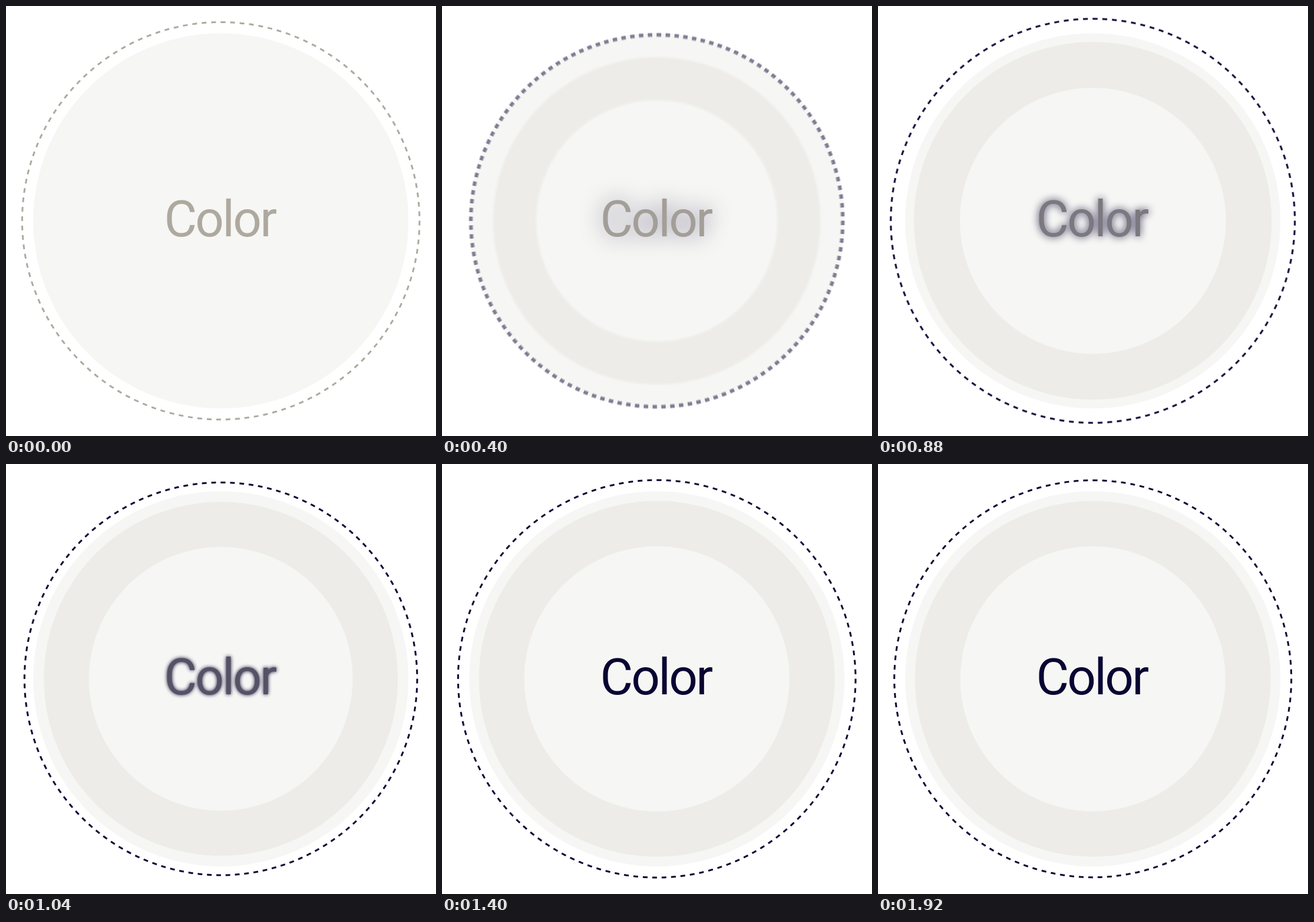
These frames come from a looping animation (730x730 px, 1960 ms). An HTML page with a canvas:

```html
<!DOCTYPE html>
<html lang="en">
<head>
<meta charset="utf-8">
<title>Color</title>
<style>
  html, body { margin: 0; width: 100%; height: 100%; overflow: hidden; background: #fff; }
  canvas { display: block; width: 730px; height: 730px; }
</style>
</head>
<body>
<canvas id="stage" width="730" height="730"></canvas>
<script>
const SIZE = 730, CENTER = 364.7, LOOP = 1960, STEP = 40, START = 240;
const SHUTTER = 20, SAMPLES = 10, DASH_COUNT = 132.08;
const INK = [8, 5, 51], MUTED = [174, 169, 159], DISC = '#f6f6f4', BAND = '#edece8';

const stage = document.getElementById('stage').getContext('2d');
const buffer = document.createElement('canvas');
buffer.width = buffer.height = SIZE;
const scene = buffer.getContext('2d');

const clamp = v => Math.max(0, Math.min(1, v));
const progress = (t, from, to) => clamp((t - from) / (to - from));
const mix = (a, b, k) => `rgb(${a.map((v, i) => Math.round(v + (b[i] - v) * k))})`;

// Decelerating growth that reaches 1 at time `hit`, then a damped swing around 1.
function bounce(t, { from, hit, power, half, amp, decay }) {
  if (t < hit) return 1 - (1 - from) * (1 - progress(t, START, hit)) ** power;
  const x = (t - hit) / half;
  return 1 + amp * Math.exp(-decay * x) * Math.sin(Math.PI * x);
}

const bandMove = { from: 0.648, hit: 480, power: 1.3, half: 440, amp: 0.1354, decay: 2.37 };
const dashMove = { from: 0.737, hit: 515, power: 1.62, half: 440, amp: 0.097, decay: 1.3 };

function disc(radius, color) {
  scene.fillStyle = color;
  scene.beginPath();
  scene.arc(CENTER, CENTER, radius, 0, 2 * Math.PI);
  scene.fill();
}

function dashes(radius, color, alpha) {
  if (alpha <= 0) return;
  const dash = Math.PI * radius / DASH_COUNT;
  scene.globalAlpha = alpha;
  scene.strokeStyle = mix(color, color, 0);
  scene.lineWidth = 3;
  scene.setLineDash([dash, dash]);
  scene.beginPath();
  scene.arc(CENTER, CENTER, radius, -Math.PI / 2, 1.5 * Math.PI);
  scene.stroke();
  scene.globalAlpha = 1;
}

function drawRings(t, shown) {
  scene.fillStyle = '#fff';
  scene.fillRect(0, 0, SIZE, SIZE);
  disc(318.5, DISC);
  if (shown > 0) {
    const scale = bounce(t, bandMove);
    scene.globalAlpha = shown;
    disc(302 * scale, BAND);
    scene.globalAlpha = 1;
    disc(225 * scale, DISC);
  }
  dashes(337.3, MUTED, 1 - shown);
  dashes(337.3 * bounce(t, dashMove), INK, shown);
}

function drawWord(color, alpha = 1, blur = 0) {
  stage.save();
  stage.font = '400 85.5px Roboto, "Liberation Sans", sans-serif';
  stage.letterSpacing = '-2.8px';
  stage.globalAlpha = alpha;
  stage.fillStyle = color;
  if (blur > 0) stage.filter = `blur(${blur}px)`;
  const x = 273.5 + stage.measureText('Color').actualBoundingBoxLeft;
  stage.fillText('Color', x, 391.3);
  stage.restore();
}

function draw(t) {
  const shown = progress(t, START - STEP, START + 2 * STEP) * (t >= START);
  // Running average of sub-steps gives the motion blur.
  for (let i = 0; i < SAMPLES; i++) {
    drawRings(t + SHUTTER * ((i + 0.5) / SAMPLES - 0.5), shown);
    stage.globalAlpha = 1 / (i + 1);
    stage.drawImage(buffer, 0, 0);
  }
  stage.globalAlpha = 1;

  // A glow focuses behind the word while the word itself darkens.
  const focus = progress(t, START, 1160);
  if (shown > 0 && focus < 1) {
    drawWord(mix(INK, INK, 0), shown * (0.35 + 0.65 * focus), 22.5 * (1 - focus));
  }
  drawWord(mix(MUTED, INK, 0.38 * focus + 0.62 * focus ** 8));
}

const origin = performance.now();
function tick() {
  const t = (performance.now() - origin) % LOOP;
  draw(Math.floor(t / STEP) * STEP);
  requestAnimationFrame(tick);
}
tick();
</script>
</body>
</html>
```
